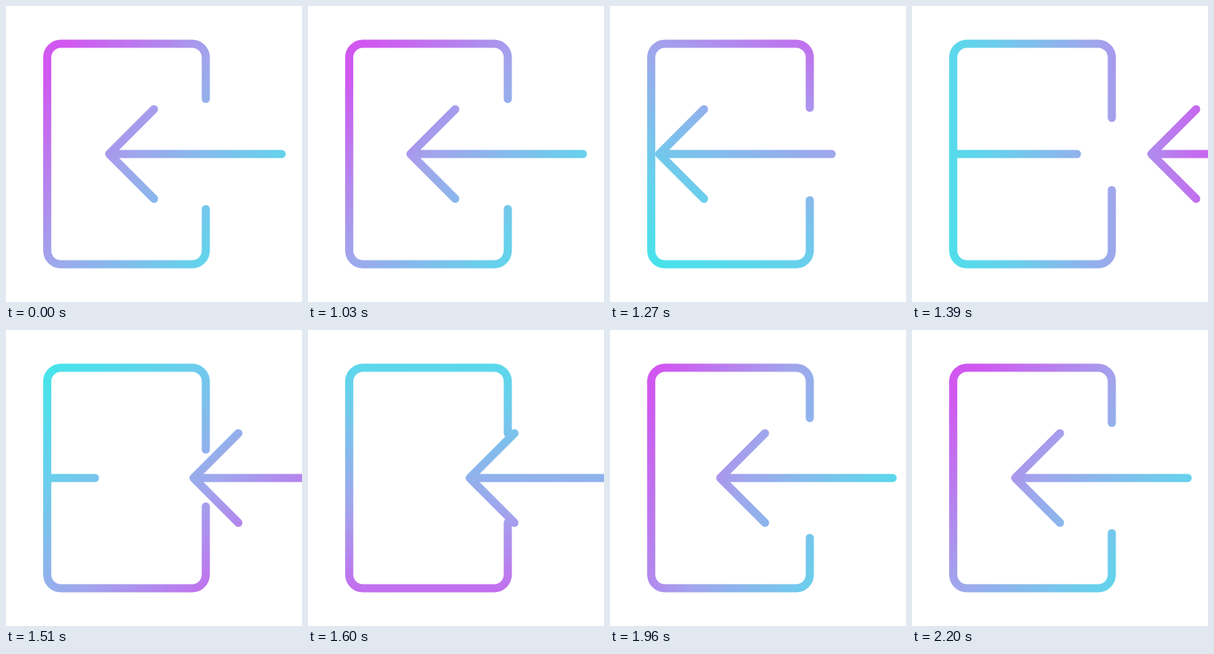
An HTML page that plays this animation: 400 by 400 pixels, repeating every 2230 ms.

```html
<!DOCTYPE html>
<html lang="en">
<head>
<meta charset="utf-8">
<title>Enter icon</title>
<style>
  html, body { margin: 0; width: 100%; height: 100%; overflow: hidden; background: #fff; }
  svg { display: block; width: 100%; height: 100%; }
</style>
</head>
<body>
<svg viewBox="0 0 400 400">
  <defs>
    <linearGradient id="tint" gradientUnits="userSpaceOnUse" x1="25" y1="200" x2="445" y2="200">
      <stop offset="0" stop-color="#d058f0"/>
      <stop offset=".381" stop-color="#a0a6ec"/>
      <stop offset=".738" stop-color="#68d0ec"/>
      <stop offset="1" stop-color="#46e4ea"/>
    </linearGradient>
    <clipPath id="inside"><rect x="55.7" width="344.3" height="400"/></clipPath>
  </defs>
  <g fill="none" stroke="url(#tint)" stroke-width="11" stroke-linecap="round" stroke-linejoin="round">
    <path id="door"/>
    <g clip-path="url(#inside)">
      <path id="leaving"/>
      <path id="arriving"/>
    </g>
  </g>
</svg>
<script>
  const LOOP = 2230, START = 1030, STEP = 30;
  const el = id => document.getElementById(id);
  const tint = el('tint'), door = el('door');
  const leaving = el('leaving'), arriving = el('arriving');

  // Smooth curve through [time, value] keys that never overshoots them.
  function curve(keys) {
    const n = keys.length - 1;
    const rate = i => (keys[i + 1][1] - keys[i][1]) / (keys[i + 1][0] - keys[i][0]);
    const slope = keys.map((k, i) => {
      if (i === 0 || i === n) return 0;
      const a = rate(i - 1), b = rate(i);
      return a * b > 0 ? 2 * a * b / (a + b) : 0;
    });
    return t => {
      if (t <= keys[0][0]) return keys[0][1];
      if (t >= keys[n][0]) return keys[n][1];
      let i = 0;
      while (t > keys[i + 1][0]) i++;
      const [t0, v0] = keys[i], [t1, v1] = keys[i + 1];
      const h = t1 - t0, s = (t - t0) / h, r = 1 - s;
      return v0 * r * r * (1 + 2 * s) + v1 * s * s * (3 - 2 * s)
        + h * s * r * (slope[i] * r - slope[i + 1] * s);
    };
  }

  const turn = curve([[1000, 0], [1270, 82], [1510, 193], [1720, 281], [1960, 346], [2200, 360]]);
  const gap = curve([[1000, 74.5], [1270, 62.5], [1510, 38.5], [1720, 94], [1960, 81], [2200, 74.5]]);
  const entry = curve([[1150, 345], [1270, 270], [1390, 184], [1510, 114], [1720, 45], [1960, 9.5], [2200, 0]]);
  const exit = t => -0.001325 * Math.pow(Math.max(0, t - 1000), 1.95);

  const arrow = x =>
    `M${200 + x} 139.5L${139.5 + x} 200L${200 + x} 260.5M${139.5 + x} 200H${372.5 + x}`;

  const frame = g =>
    `M270 ${200 - g}V69.5A18.5 18.5 0 0 0 251.5 51H74.2A18.5 18.5 0 0 0 55.7 69.5` +
    `V330.5A18.5 18.5 0 0 0 74.2 349H251.5A18.5 18.5 0 0 0 270 330.5V${200 + g}`;

  function draw(ms) {
    let t = ms % LOOP;
    t = t < START ? 0 : START + Math.floor((t - START) / STEP) * STEP;
    tint.setAttribute('gradientTransform', `rotate(${38 + turn(t)} 225 200)`);
    door.setAttribute('d', frame(gap(t)));
    leaving.setAttribute('d', arrow(exit(t)));
    arriving.setAttribute('d', arrow(entry(t)));
    arriving.style.display = t > 1150 ? '' : 'none';
  }

  let begin;
  function tick(now) {
    if (begin === undefined) begin = now;
    draw(now - begin);
    requestAnimationFrame(tick);
  }
  draw(0);
  requestAnimationFrame(tick);
</script>
</body>
</html>
```
